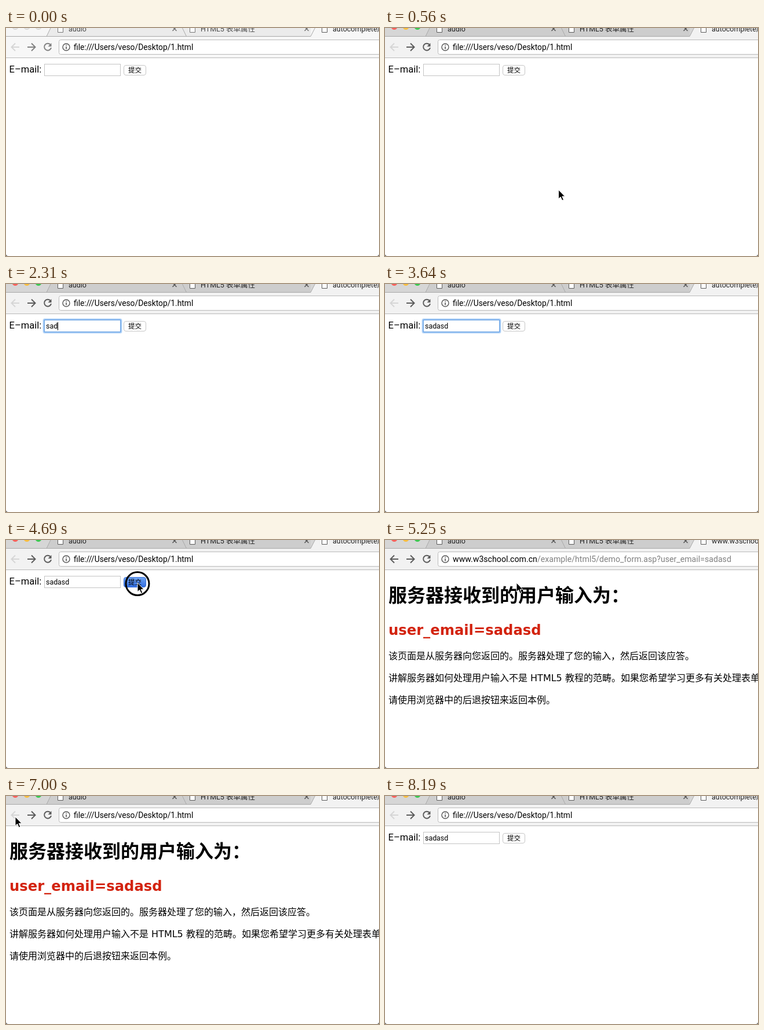
An HTML page for the animation above (8.68 s loop, 644x394 px).

```html
<!DOCTYPE html>
<html lang="zh-CN">
<head>
<meta charset="utf-8">
<title>Form demo</title>
<style>
html, body { margin: 0; width: 100%; height: 100%; overflow: hidden; background: #fff; }
svg { display: block; width: 644px; height: 394px; }
text { white-space: pre; }
.ui { font-family: Roboto, "Noto Sans CJK SC", "Noto Sans CJK", sans-serif; }
.page { font-family: "DejaVu Sans", "Noto Sans CJK SC", "Noto Sans CJK", sans-serif; font-size: 16px; }
.tab { font-size: 12.5px; fill: #222; }
.line { fill: none; stroke: #5c5c5c; stroke-width: 2; }
</style>
</head>
<body>
<svg viewBox="0 0 644 394">
  <defs>
    <linearGradient id="blue" x2="0" y2="1">
      <stop stop-color="#70a5f3"/><stop offset="1" stop-color="#2f6be0"/>
    </linearGradient>
    <g id="doc" fill="#fff" stroke="#5a5a5a"><path d="M.5 -5H9.5V7.5H.5Z"/></g>
    <path id="close" d="M0 0L7 7M7 0L0 7" stroke="#555" stroke-width="1.5"/>
  </defs>

  <g class="ui">
    <rect id="strip" width="644" height="15"/>
    <g id="lights"></g>
    <path id="tabs" d="M70 14.5L77.500 -1H304L311.500 14.500L319 14.500H526V-1H304L311.500 14.500Z" stroke="none"/>
    <path d="M0 14.500H526M70 14.500L77.500 -1M304 -1L311.500 14.500" fill="none" stroke="#a9a9a9"/>
    <path id="front" d="M526 15L534 -1H645V15Z"/>
    <path d="M526 14.500L534 -1" stroke="#a9a9a9"/>
    <g id="tabText">
      <use href="#doc" x="89"/><use href="#doc" x="317"/>
      <use href="#close" x="287.500" y="-2"/><use href="#close" x="515.500" y="-2"/>
      <text class="tab" x="108" y="5.500">audio</text>
      <text class="tab" x="336" y="5.500">HTML5 表单属性</text>
    </g>
    <use href="#doc" x="545"/>
    <text class="tab" id="title" x="564" y="5.500"></text>

    <rect id="bar" y="15" width="644" height="36"/>
    <path d="M0 51.500H644" stroke="#b8b8b8"/>
    <path id="back" class="line" d="M23 33H10M16 26.500L9.500 33L16 39.500"/>
    <g id="nav" class="line">
      <path d="M37 33H50M44 26.500L50.500 33L44 39.500"/>
      <path d="M76.500 28.500A6 6 0 1 0 78 34"/>
      <path d="M78.500 26V32H72.500Z" fill="#5c5c5c" stroke="none"/>
    </g>
    <rect x="91.500" y="20.500" width="580" height="25" rx="3" fill="#fff" stroke="#b9b9b9"/>
    <circle cx="104" cy="33" r="6" fill="none" stroke="#555" stroke-width="1.400"/>
    <path d="M104 32V36.500M104 29V30.600" stroke="#555" stroke-width="1.600"/>
    <text id="fileUrl" x="117" y="38" font-size="13.800">file:///Users/veso/Desktop/1.html</text>
    <text id="webUrl" x="117" y="38" font-size="14.150">www.w3school.com.cn<tspan fill="#808080">/example/html5/demo_form.asp?user_email=sadasd</tspan></text>
  </g>

  <g id="form" class="ui">
    <text x="5.500" y="77" font-size="16.500">E–mail:</text>
    <rect x="66.500" y="62.500" width="131" height="20" fill="#fff" stroke="#c4c4c4"/>
    <g id="focus" fill="none">
      <rect x="65" y="61" width="134" height="23" rx="2" stroke="#b9d7f8" stroke-width="3"/>
      <rect x="66" y="62" width="132" height="21" rx="1" stroke="#6ba6ea" stroke-width="1.500"/>
    </g>
    <text id="value" x="69" y="77" font-size="12.400"></text>
    <path id="caret" d="M0 66V80" stroke="#000"/>
    <rect id="button" x="203.500" y="64.500" width="38" height="17" rx="3.500"/>
    <text x="211" y="77" font-size="11.500">提交</text>
  </g>

  <g id="reply" class="page">
    <text x="6" y="107" font-size="32" font-weight="700">服务器接收到的用户输入为：</text>
    <text x="6" y="164" font-size="24.250" font-weight="700" fill="#d3230f">user_email=sadasd</text>
    <text x="6" y="206">该页面是从服务器向您返回的。服务器处理了您的输入，然后返回该应答。</text>
    <text x="6" y="244">讲解服务器如何处理用户输入不是 HTML5 教程的范畴。如果您希望学习更多有关处理表单</text>
    <text x="6" y="282">请使用浏览器中的后退按钮来返回本例。</text>
  </g>

  <path d="M0 391V394H3Q.5 393.500 0 391ZM644 391V394H641Q643.500 393.500 644 391Z" fill="#555"/>
  <circle id="ring" r="20" fill="none" stroke="#000" stroke-width="3"/>
  <path id="arrow" d="M0 0V15.500L3.600 12.200L6.200 18.300L8.800 17.200L6.200 11.300H11Z" stroke="#fff" stroke-width="1"/>
</svg>

<script>
const LOOP = 8680, STEP = 70;
const $ = id => document.getElementById(id);
const within = (t, a, b) => t >= a && t < b;
const show = (id, on) => $(id).setAttribute('visibility', on ? 'visible' : 'hidden');
const fill = (id, color) => $(id).setAttribute('fill', color);
const grey = (a, b, k) => { const v = Math.round(a + (b - a) * k); return `rgb(${v},${v},${v})`; };

const lamps = ['#f9605a', '#f9be3e', '#3ac950'].map((color, i) => {
  const c = document.createElementNS('http://www.w3.org/2000/svg', 'circle');
  c.setAttribute('cx', 16 + i * 20);
  c.setAttribute('cy', -3);
  c.setAttribute('r', 5.5);
  $('lights').append(c);
  return { c, color };
});

// Pointer moves: start, end, from, to
const moves = [
  [280, 1120, 352, 357, 150, 59],
  [3850, 4550, 150, 59, 227, 74],
  [5670, 6020, 227, 74, 357, 255],
  [6020, 6510, 357, 255, 16, 36],
  [7420, 7770, 16, 36, 341, 218],
  [8050, 8190, 341, 218, 354, 394]
];
const visible = [[280, 1960], [3850, 8190]];
const clicks = [[1260, 1540], [4620, 4900], [6650, 6930]];
const keys = [1960, 2100, 2240, 2450, 2660, 2870];

const ease = k => k * k * (3 - 2 * k);

function pointer(t) {
  let [, , x, y] = moves[0];
  for (const [a, b, x0, y0, x1, y1] of moves) {
    if (t < a) break;
    const k = ease(Math.min(1, (t - a) / (b - a)));
    x = x0 + (x1 - x0) * k;
    y = y0 + (y1 - y0) * k;
  }
  return [x, y];
}

function draw(t) {
  const active = Math.min(1, t / 140);
  fill('strip', grey(246, 214, active));
  fill('tabs', grey(235, 205, active));
  fill('front', grey(247, 242, active));
  fill('bar', grey(247, 242, active));
  $('tabText').setAttribute('opacity', 0.8 + 0.2 * active);
  $('nav').setAttribute('opacity', 0.75 + 0.25 * active);
  for (const { c, color } of lamps) {
    c.setAttribute('fill', active < 1 ? '#e6e6e6' : color);
    c.setAttribute('stroke', active < 1 ? '#d0d0d0' : color);
  }

  const web = within(t, 5110, 6930), reply = within(t, 5110, 7070);
  $('title').textContent = web ? 'www.w3school.com.cn' : 'autocomplete属性';
  show('webUrl', web);
  show('fileUrl', !web);
  $('back').style.stroke = web ? '#5c5c5c' : '#d6d6d6';
  show('reply', reply);
  show('form', !reply);

  const typed = keys.filter(k => t >= k).length;
  $('value').textContent = 'sadasd'.slice(0, typed);
  show('focus', !reply && within(t, 1260, 4620));
  show('caret', within(t, 1400, 3430) || within(t, 3920, 4410));
  const textWidth = typed ? $('value').getComputedTextLength() : 0;
  $('caret').setAttribute('transform', `translate(${Math.round(69 + textWidth) + 0.5})`);

  const pressed = within(t, 4620, 4830);
  fill('button', pressed ? 'url(#blue)' : '#fff');
  $('button').setAttribute('stroke', pressed ? '#3a70d8' : '#c6c6c6');

  const [x, y] = pointer(t);
  show('arrow', visible.some(([a, b]) => within(t, a, b)));
  show('ring', clicks.some(([a, b]) => within(t, a, b)));
  $('arrow').setAttribute('transform', `translate(${x} ${y})`);
  $('ring').setAttribute('transform', `translate(${x} ${y + 1.5})`);
}

const start = performance.now();
function tick() {
  const t = (performance.now() - start) % LOOP;
  draw(Math.floor(t / STEP) * STEP);
  requestAnimationFrame(tick);
}
tick();
</script>
</body>
</html>
```
